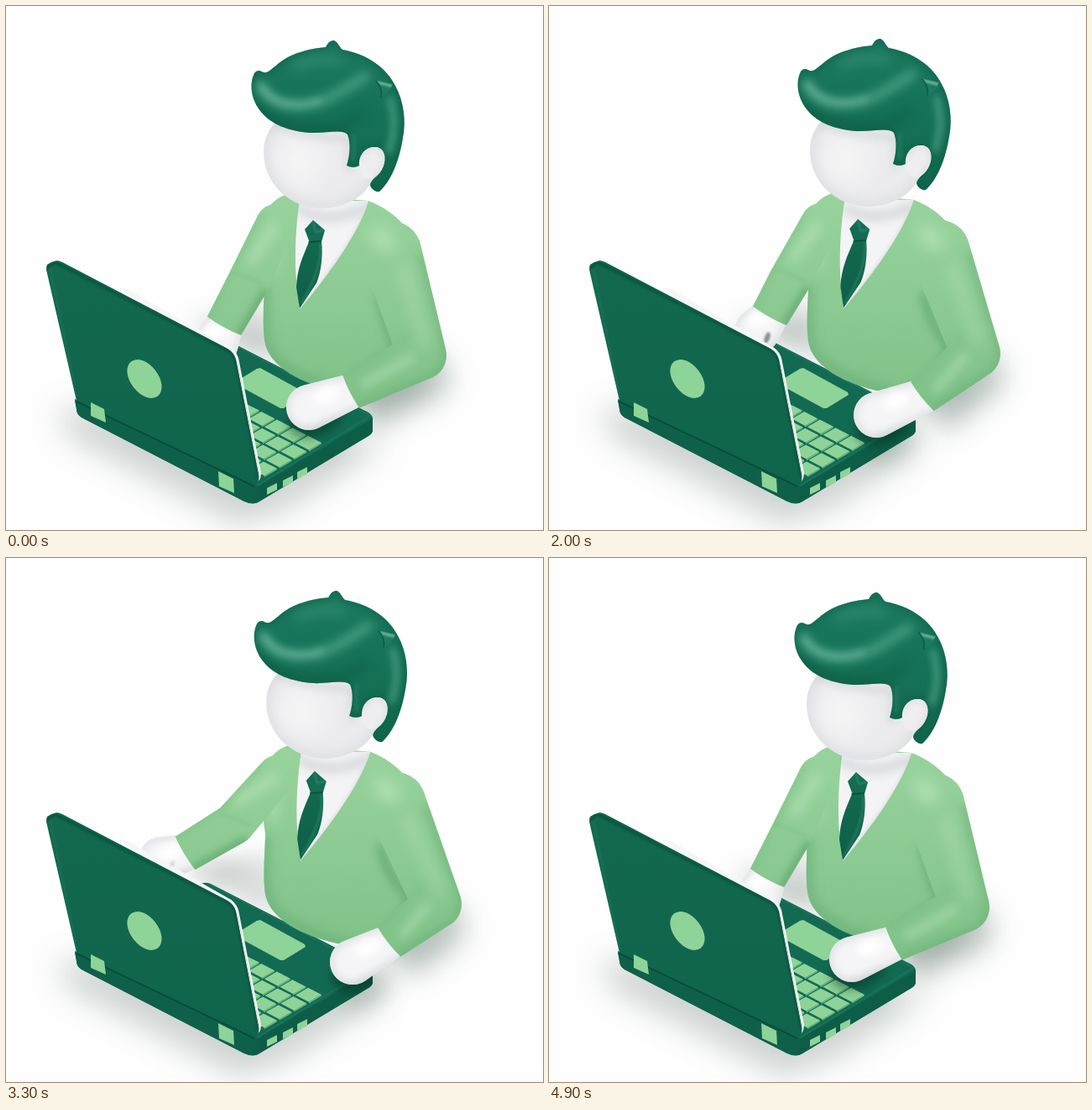
An HTML page with a canvas for the animation above (5 s loop, 640 by 624 pixels).

```html
<!DOCTYPE html>
<html lang="en">
<head>
<meta charset="utf-8">
<title>Typing at a laptop</title>
<style>
  html, body { margin: 0; width: 100%; height: 100%; overflow: hidden; background: #fefefe; }
  canvas { display: block; width: 640px; height: 624px; }
</style>
</head>
<body>
<canvas id="stage" width="640" height="624"></canvas>
<script>
const g = document.getElementById('stage').getContext('2d');
const LOOP = 5000, STEP = 100;
const P = d => new Path2D(d);

// head shift, right elbow, cuff, hand, left elbow, cuff, hand, thumb gap
const POSES = [
  [0, 0, 496, 416, 411, 459, 361, 478, 288, 330, 260, 381, 250, 402, 0],
  [-3, 3, 478, 424, 391, 467, 340, 482, 289, 338, 266, 388, 264, 410, 0],
  [-5, 4, 471, 437, 376, 450, 322, 455, 290, 345, 270, 390, 270, 427, 1],
  [4, -2, 509, 414, 445, 465, 390, 487, 287, 326, 263, 369, 248, 387, .7],
  [5, -3, 520, 410, 480, 462, 439, 492, 265, 311, 196, 344, 163, 349, 0],
  [0, 0, 503, 416, 414, 449, 365, 461, 284, 327, 246, 365, 226, 377, .5]
];
// time, pose
const KEYS = [[0, 0], [600, 0], [900, 1], [1400, 2], [1700, 2], [2000, 3],
  [2400, 4], [3100, 4], [3600, 5], [4200, 5], [4700, 0], [5000, 0]];

function poseAt(t) {
  const i = KEYS.findIndex(k => k[0] > t);
  const [t0, a] = KEYS[i - 1], [t1, b] = KEYS[i];
  const u = (t - t0) / (t1 - t0), e = u * u * (3 - 2 * u);
  return POSES[a].map((v, n) => v + (POSES[b][n] - v) * e);
}

const SHAPES = {
  torso: P('M335 224C312 232 302 252 300 280L308 330C307 360 305 390 310 406C318 430 350 449 395 459C430 466 464 458 476 432C488 404 492 350 492 300C487 270 466 245 432 232Z'),
  collar: P('M350 232C344 270 344 310 347 335L350 361C383 322 420 272 432 232Z'),
  knot: P('M366 255L380 267L376 281L362 282L356 266Z'),
  tie: P('M361 281L376 280C378 300 375 318 370 330L350 360L346 335C347 312 354 298 361 281Z'),
  face: P('M307 174C307 142 332 122 372 122C415 122 442 145 442 184C441 220 412 240 376 241C336 240 307 210 307 174Z'),
  ear: P('M421 190C420 178 428 168 439 168C449 168 453 176 451 187C448 199 440 206 432 206C425 205 421 200 421 190Z'),
  hair: P('M301 77C304 77 306 80 310 79C316 78 323 67 340 59C356 52 370 50 381 49C384 43 387 41 391 41C396 43 397 49 401 52C430 57 453 73 464 95C474 113 477 137 473 157C469 183 459 209 445 221C441 222 435 218 434 213C435 206 445 202 449 191C454 178 449 168 440 168C430 167 422 177 421 190Q414 194 406 190C410 178 411 163 407 153C400 146 382 152 362 151C337 149 316 141 304 126C293 113 289 94 296 80Q298 77 301 77Z'),
  spike: P('M440 88L461 93Q457 104 447 109C448 100 446 94 440 88Z'),
  swoosh: P('M303 95C314 117 342 124 374 114C398 106 412 92 428 84'),
  base: P('M82 470L226 392Q234 384 244 388L432 484Q438 488 437 494L437 505Q437 509 432 512L302 590Q294 595 284 590L90 490Q84 486 84 480Z'),
  side: P('M300 572L437 491L437 505Q437 509 432 512L302 590Q298 593 292 592L290 576Z'),
  lid: P('M58 304Q61 302 67 305L264 408Q272 413 274 421L301 558Q303 571 293 570L84 470L48 314Q47 306 58 304Z'),
  bezel: P('M135 336Q143 335 152 341L263 404Q274 409 277 419L304 556Q304 566 297 568L270 430Z'),
  hinge: P('M82 468L297 572L300 578L294 592L284 590L90 490Q84 486 84 480Z')
};

function fill(path, color) {
  g.fillStyle = color;
  g.fill(path);
}
function poly(color, ...pts) {
  fill(P('M' + pts.join('L') + 'Z'), color);
}
function vertical(y0, y1, a, b) {
  const c = g.createLinearGradient(0, y0, 0, y1);
  c.addColorStop(0, a);
  c.addColorStop(1, b);
  return c;
}
// blurred stroke (or fill, when width is 0), kept inside a clip if given
function soft(clip, path, color, width, blur) {
  g.save();
  if (clip) g.clip(clip);
  g.filter = `blur(${blur}px)`;
  g.fillStyle = g.strokeStyle = color;
  g.lineWidth = width;
  g.lineCap = g.lineJoin = 'round';
  if (width) g.stroke(path); else g.fill(path);
  g.restore();
}
function oval(x, y, rx, ry, turn = 0) {
  const p = new Path2D();
  p.ellipse(x, y, rx, ry, turn, 0, 7);
  return p;
}
function hull(p, x1, y1, r1, x2, y2, r2) {
  const d = Math.max(Math.hypot(x2 - x1, y2 - y1), Math.abs(r1 - r2) + .1);
  const a = Math.atan2(y2 - y1, x2 - x1), b = Math.acos((r1 - r2) / d);
  p.moveTo(x1 + r1 * Math.cos(a + b), y1 + r1 * Math.sin(a + b));
  p.arc(x1, y1, r1, a + b, a - b + 2 * Math.PI);
  p.arc(x2, y2, r2, a - b, a + b);
  p.closePath();
  return p;
}
// forearm ending in a nearly flat cuff
function sleeve(p, ex, ey, r, cx, cy, w) {
  const a = Math.atan2(cy - ey, cx - ex), c = Math.cos(a), s = Math.sin(a);
  p.moveTo(ex - r * s, ey + r * c);
  p.arc(ex, ey, r, a + Math.PI / 2, a + Math.PI * 1.5);
  p.lineTo(cx + w * s, cy - w * c);
  p.quadraticCurveTo(cx + 3 * c, cy + 3 * s, cx - w * s, cy + w * c);
  p.closePath();
  return p;
}

const cloth = () => vertical(240, 470, '#97d29c', '#80c288');

function shadows(p) {
  soft(null, P('M62 478L74 512L278 618L340 596L455 520L300 500Z'), 'rgba(40,60,52,.22)', 0, 18);
  soft(null, P('M215 378L310 350L330 425L480 440L500 455L440 480Z'), 'rgba(30,60,48,.17)', 0, 13);
  const arm = sleeve(new Path2D(), p[2] + 4, p[3] + 26, 28, p[4] + 14, p[5] + 24, 24);
  soft(null, arm, 'rgba(40,70,54,.32)', 0, 16);
  soft(null, oval(p[6] + 14, p[7] + 30, 34, 20, -.4), 'rgba(40,70,54,.3)', 0, 14);
  soft(null, oval(p[10] + 35, p[11] + 18, 34, 14), 'rgba(40,65,52,.1)', 0, 11);
}

function keyboard() {
  for (let row = 0; row < 4; row++) {
    for (let col = 0; col < 6; col++) {
      const x = 376 - col * 18.6 - row * 17.7, y = 520 - col * 9.6 + row * 10.2;
      poly('#8ed398', [x, y], [x - 16, y - 8.2], [x - 31, y + .4], [x - 15, y + 8.8]);
      poly('#6fb981', [x, y], [x, y + 1.6], [x - 15, y + 10.4], [x - 15, y + 8.8]);
    }
  }
}

function laptopBase() {
  fill(SHAPES.base, '#126a52');
  fill(SHAPES.side, vertical(490, 592, '#0c5d47', '#0e5c47'));
  soft(SHAPES.base, P('M242 388L434 488L300 571'), '#1d7660', 1.4, .7);
  poly('#8ed398', [303, 431], [356, 460], [357, 463], [331, 479], [327, 479], [279, 453], [276, 446], [299, 432]);
  keyboard();
  for (const [x, y] of [[311, 574], [330, 565], [347, 555]])
    poly('#8ed398', [x, y], [x + 12, y - 6], [x + 12, y + 2], [x, y + 8]);
}

function laptopLid() {
  fill(SHAPES.bezel, '#f5f6f6');
  soft(SHAPES.bezel, P('M276 425L303 562'), '#d5dbd9', 1, .6);
  fill(SHAPES.hinge, '#0e604a');
  fill(SHAPES.lid, vertical(304, 572, '#13694f', '#0f644c'));
  soft(SHAPES.lid, P('M50 311L58 305L264 410Q271 414 274 423L301 560'), '#0a5742', 4, 1.2);
  soft(SHAPES.lid, P('M53 314L84 466'), '#1f755e', 1.5, 1);
  soft(null, P('M84 471L296 572'), '#084a38', 1.6, .5);
  fill(oval(165, 444, 16.5, 26, -.66), '#8ed398');
  poly('#8ed398', [101, 472], [117, 480], [119, 496], [101, 488]);
  poly('#8ed398', [253, 554], [271, 563], [272, 580], [254, 572]);
}

function body(p) {
  const k = p[0] * .003, j = p[1] * .003;
  g.save();
  g.transform(1, 0, -k, 1 - j, 450 * k, 450 * j);
  const t = SHAPES.torso;
  fill(t, cloth());
  soft(t, P('M306 335Q305 400 315 417Q350 450 420 464L480 447'), '#6cb17a', 11, 7);
  soft(t, P('M326 250Q312 270 318 310'), 'rgba(205,240,204,.45)', 12, 8);
  soft(t, P(`M446 345Q455 385 ${p[2] - 30} ${p[3] - 6}L${p[4] + 4} ${p[5] - 16}`), 'rgba(85,155,102,.7)', 9, 6);
  const c = SHAPES.collar;
  fill(c, '#f4f4f6');
  soft(c, P('M350 242Q385 262 430 240'), '#d3d5d8', 10, 6);
  soft(c, P('M432 234C420 272 383 322 350 361'), '#d8dbdc', 3, 2);
  fill(SHAPES.tie, vertical(280, 360, '#12694f', '#0d5f48'));
  soft(SHAPES.tie, P('M375 284Q376 315 352 354'), '#2b8168', 2, 1.5);
  fill(SHAPES.knot, '#136c53');
  soft(SHAPES.knot, P('M366 257L369 269L378 267'), '#2e856c', 2, 1);
  soft(null, P('M361 281L375 280'), '#084c39', 1.4, .6);
  g.restore();
}

function mitten(hx, hy, cx, cy, wrist) {
  const m = hull(new Path2D(), hx, hy, 27, cx, cy, wrist);
  fill(m, '#f5f5f7');
  soft(m, m, '#d6d9dc', 6, 5);
  soft(m, oval(hx + 12, hy + 27, 34, 5, -.4), 'rgba(170,180,180,.4)', 0, 6);
  soft(m, oval((hx + cx) / 2 - 4, (hy + cy) / 2 - 5, 17, 10, -.4), 'rgba(255,255,255,.9)', 0, 5);
}

function arm(sx, sy, sr, ex, ey, er, cx, cy, w) {
  const whole = hull(new Path2D(), sx, sy, sr, ex, ey, er);
  sleeve(whole, ex, ey, er, cx, cy, w);
  fill(whole, cloth());
  return whole;
}

function leftArm(p) {
  const [ex, ey, cx, cy, hx, hy, gap] = p.slice(8);
  mitten(hx, hy, cx, cy, 22);
  if (gap > .02) soft(null, oval(hx + 12, hy + 8, 3.2, 7, .35), `rgba(35,65,55,${gap * .75})`, 0, .9);
  const a = arm(321 + p[0] * .6, 259 + p[1] * .6, 23, ex, ey, 25, cx, cy, 23);
  const d = Math.hypot(ex - cx, ey - cy), nx = (ey - cy) / d, ny = (cx - ex) / d;
  soft(a, P(`M${cx - nx * 22} ${cy - ny * 22}L${ex - nx * 24} ${ey - ny * 24}`), 'rgba(90,160,105,.75)', 9, 5);
  soft(a, P(`M${cx + nx * 22} ${cy + ny * 22}L${ex + nx * 25} ${ey + ny * 25}L304 246`), 'rgba(112,184,126,.6)', 4, 4);
  soft(a, P(`M${ex + 4} ${ey - 26}L320 262`), 'rgba(208,240,208,.5)', 10, 7);
  soft(a, P(`M${ex - 17} ${ey - 12}Q${ex} ${ey - 8} ${ex + 17} ${ey + 1}`), 'rgba(100,172,116,.4)', 2, 2);
}

function rightArm(p) {
  const [ex, ey, cx, cy, hx, hy] = p.slice(2);
  soft(SHAPES.base, oval(hx + 8, hy + 12, 34, 22, -.4), 'rgba(0,40,28,.45)', 0, 6);
  mitten(hx, hy, cx, cy, 21);
  const sx = 459 + p[0] * 1.6, sy = 292 + p[1] * .6;
  const a = arm(sx, sy, 36, ex, ey, 29, cx, cy, 22);
  const d = Math.hypot(ex - cx, ey - cy), nx = (ey - cy) / d, ny = (cx - ex) / d;
  soft(a, P(`M${cx + nx * 22} ${cy + ny * 22}L${ex + nx * 27} ${ey + ny * 27}`), 'rgba(110,180,123,.4)', 5, 4);
  soft(a, P(`M${cx - nx * 22} ${cy - ny * 22}L${ex - nx * 29} ${ey - ny * 29}Q${ex + 28} ${ey + 18} ${ex + 30} ${ey - 8}L${sx + 37} ${sy + 5}`), 'rgba(98,168,113,.7)', 7, 6);
  soft(a, P(`M${sx + 14} ${sy + 20}L${ex + 3} ${ey - 15}`), 'rgba(205,240,205,.35)', 12, 9);
  soft(a, P(`M${cx + 16} ${cy - 9}L${ex - 12} ${ey + 3}`), 'rgba(208,240,208,.42)', 9, 6);
  soft(null, oval(sx - 10, sy - 14, 19, 11, .7), 'rgba(208,242,208,.5)', 0, 9);
}

function head(p) {
  g.save();
  g.translate(p[0], p[1]);
  const { face, hair, ear, swoosh, spike } = SHAPES;
  fill(face, '#ececee');
  soft(face, face, '#d2d4d8', 7, 7);
  soft(face, oval(350, 185, 27, 27), 'rgba(255,255,255,.5)', 0, 14);
  soft(face, P('M305 130Q340 157 408 157L409 195'), 'rgba(175,181,183,.4)', 6, 5);
  fill(hair, vertical(42, 222, '#1b7a60', '#10694f'));
  soft(hair, hair, '#0d5c46', 4, 4);
  soft(hair, P('M304 122Q328 146 370 145Q400 144 425 128'), 'rgba(8,80,59,.5)', 8, 7);
  soft(hair, swoosh, 'rgba(84,168,142,.75)', 12, 6);
  soft(hair, P('M304 95C317 117 347 122 374 112'), 'rgba(135,200,180,.6)', 5, 4);
  soft(hair, P('M345 72Q370 60 397 66'), 'rgba(62,148,122,.65)', 10, 7);
  soft(hair, P('M458 112Q467 143 456 173'), 'rgba(95,176,151,.75)', 6, 4);
  soft(hair, P('M414 154L414 184'), 'rgba(65,150,124,.5)', 3, 2);
  fill(spike, '#1d7a60');
  soft(spike, P('M443 91L459 95'), '#66b198', 3.5, 1.2);
  soft(null, P('M441 89Q449 98 447 108'), '#0a5942', 1.4, .7);
  fill(ear, '#eeeef0');
  soft(ear, P('M423 182Q428 168 440 168Q452 170 451 187L440 204'), '#d6d8db', 3, 3);
  g.restore();
}

function draw(t) {
  const p = poseAt(t);
  g.fillStyle = '#fefefe';
  g.fillRect(0, 0, 640, 624);
  shadows(p);
  laptopBase();
  body(p);
  leftArm(p);
  laptopLid();
  rightArm(p);
  head(p);
}

const start = performance.now();
let shown = -1;
function tick() {
  const t = Math.floor((performance.now() - start) % LOOP / STEP) * STEP;
  if (t !== shown) draw(shown = t);
  requestAnimationFrame(tick);
}
tick();
</script>
</body>
</html>
```
